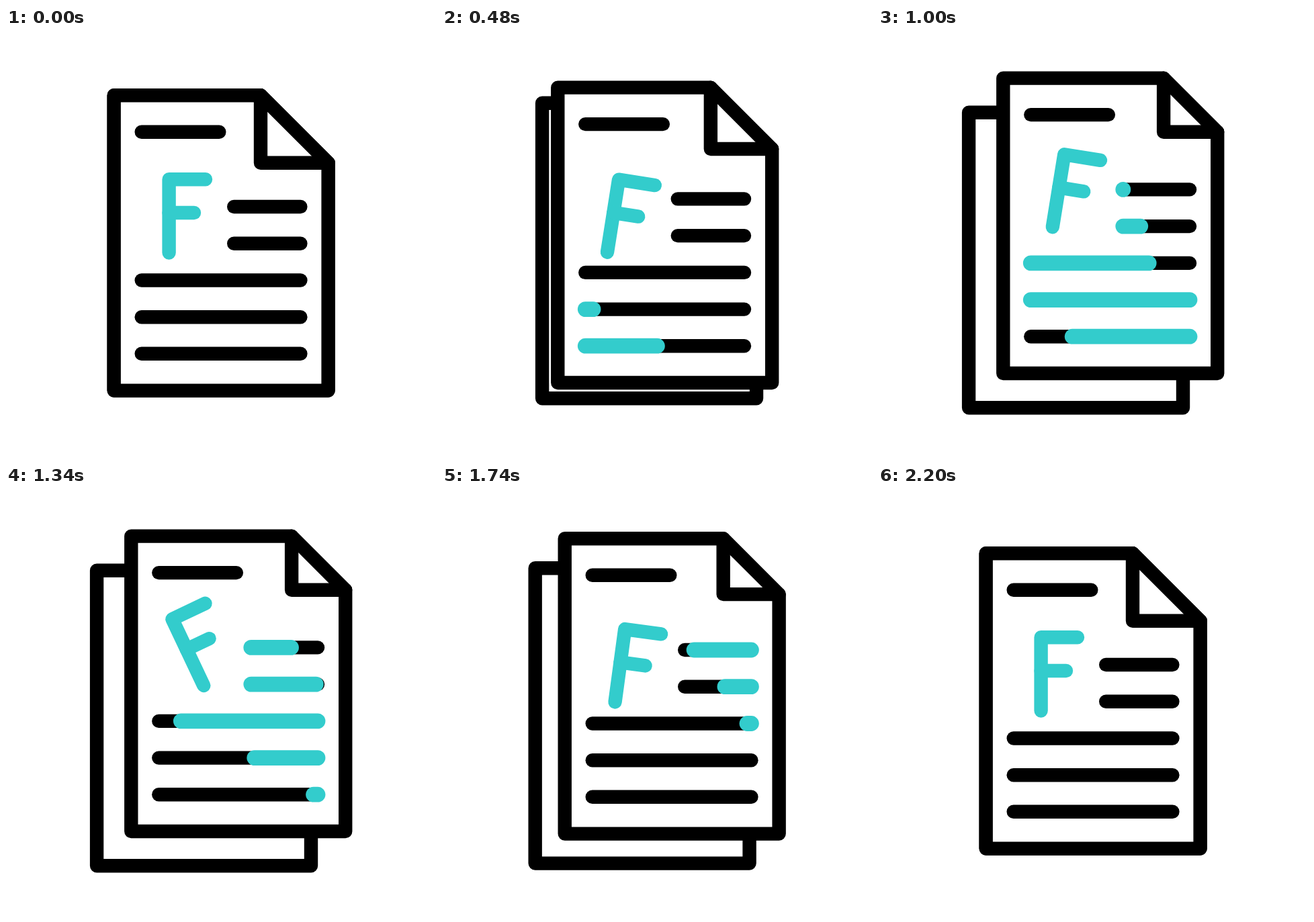
Animation, 640 px wide and 640 px high, one loop 2.4 s. Source, as an HTML page with a canvas:

```html
<!DOCTYPE html>
<html lang="en">
<head>
<meta charset="utf-8">
<title>Document</title>
<style>
html, body { margin: 0; width: 100%; height: 100%; overflow: hidden; background: #fff; }
canvas { display: block; width: 640px; height: 640px; }
</style>
</head>
<body>
<canvas id="stage" width="640" height="640"></canvas>
<script>
const ctx = document.getElementById('stage').getContext('2d');
const LOOP = 2400, SHIFT = 25.6, TEAL = '#33cccc';
const LEFT = 160.7, TOP = 100.2, RIGHT = 479.6, BOTTOM = 539.6;

// Text lines from bottom to top: left end, y
const lines = [[201.7, 484.8], [201.7, 430.2], [201.7, 375.5], [339.2, 320.7], [339.2, 266]];
const LINE_END = 438.4;

// Keys: time, value
const swing = [[200, 0], [600, 11.4], [1000, 9.2], [1400, -27.5], [1800, 9.9], [2200, 0]];
const bob = [[200, 0], [700, 26.3], [1200, -26], [1700, 13.3], [2200, 0]];

function ease(t, start, length = 600) {
  const u = Math.min(1, Math.max(0, (t - start) / length));
  return u * u * (3 - 2 * u);
}

function track(keys, t) {
  let value = keys[0][1];
  for (let i = 1; i < keys.length; i++) {
    const [t0, v0] = keys[i - 1], [t1, v1] = keys[i];
    value += (v1 - v0) * ease(t, t0, t1 - t0);
  }
  return value;
}

function stroke(points, color = '#000', width = 20.4, closed = false) {
  ctx.beginPath();
  points.forEach(([x, y]) => ctx.lineTo(x, y));
  if (closed) {
    ctx.closePath();
    ctx.fillStyle = '#fff';
    ctx.fill();
  }
  ctx.strokeStyle = color;
  ctx.lineWidth = width;
  ctx.stroke();
}

function sheet(fold) {
  const x = RIGHT - fold, y = TOP + fold;
  stroke([[LEFT, TOP], [x, TOP], [RIGHT, y], [RIGHT, BOTTOM], [LEFT, BOTTOM]], '#000', 20.4, true);
  stroke([[x, TOP], [x, y], [RIGHT, y]]);
}

function letter(t) {
  ctx.save();
  ctx.translate(269.8, 279.9 + track(bob, t));
  ctx.rotate(track(swing, t) * Math.PI / 180);
  ctx.translate(-269.8, -279.9);
  stroke([[297, 225.2], [242.6, 225.2], [242.6, 334.6]], TEAL);
  stroke([[242.6, 275], [280, 275]], TEAL);
  ctx.restore();
}

function textLine([x, y], i, t) {
  stroke([[x, y], [LINE_END, y]]);
  const start = 200 + i * 200, width = LINE_END - x;
  const head = ease(t, start), tail = ease(t, start + 600);
  if (head > tail) stroke([[x + width * tail, y], [x + width * head, y]], TEAL, 22.8);
}

function draw(now) {
  const t = now % LOOP;
  const open = ease(t, 200) - ease(t, 1600), d = SHIFT * open;
  ctx.fillStyle = '#fff';
  ctx.fillRect(0, 0, 640, 640);
  ctx.lineCap = ctx.lineJoin = 'round';

  ctx.save();
  ctx.translate(-d, d);
  sheet(100.6);
  ctx.restore();

  ctx.save();
  ctx.translate(d, -d);
  sheet(100.6 - 20.5 * open);
  stroke([[201.7, 154.7], [317.3, 154.7]]);
  lines.forEach((line, i) => textLine(line, i, t));
  letter(t);
  ctx.restore();
}

const begin = performance.now();
function tick() {
  draw(performance.now() - begin);
  requestAnimationFrame(tick);
}
tick();
</script>
</body>
</html>
```
